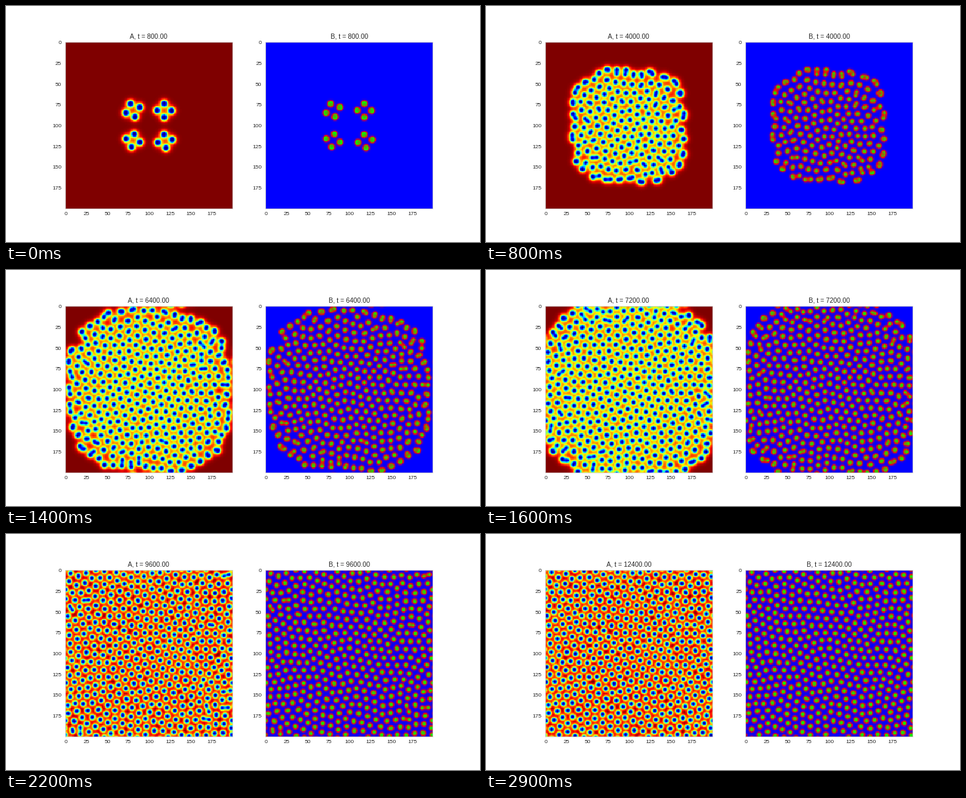
Write a matplotlib script that moves like this. It is 720x360 px and loops after 3 s.

```python
import numpy as np
import matplotlib.pyplot as plt
from matplotlib.animation import FuncAnimation

# Gray-Scott reaction-diffusion on a periodic grid
N = 200
DA, DB, FEED, KILL = 0.14, 0.06, 0.035, 0.065
T_SEED, T_FIRST, T_STEP = 700, 800, 400
FRAMES, INTERVAL = 30, 100

# four colonies of four cells each, as (x, y)
COLONIES = np.array([
    [(77.6, 73.6), (88.6, 77.6), (72.1, 84.7), (82.7, 89.4)],
    [(117.8, 73.6), (126.5, 81.9), (109.5, 81.5), (117.8, 89.8)],
    [(81.9, 110.3), (72.5, 115.5), (88.6, 119.8), (78.8, 125.3)],
    [(117.8, 110.7), (127.3, 116.6), (110.3, 120.2), (119.8, 126.5)],
])

plt.rcParams.update({
    "font.family": "Liberation Sans",
    "text.color": "0.15",
    "axes.edgecolor": "0.8",
    "axes.linewidth": 1,
    "axes.titlesize": 12,
    "xtick.labelsize": 10,
    "ytick.labelsize": 10,
    "xtick.color": "0.15",
    "ytick.color": "0.15",
    "xtick.major.size": 0,
    "ytick.major.size": 0,
    "xtick.major.pad": 7,
    "ytick.major.pad": 7,
})


def seed():
    """Padded fields A and B with a young cell at each seed point."""
    y, x = np.mgrid[:N, :N]
    a = np.ones((N + 2, N + 2), np.float32)
    b = np.zeros_like(a)
    for colony in COLONIES:
        centre = colony.mean(axis=0)
        for cx, cy in centre + 0.93 * (colony - centre):
            r2 = (x - cx) ** 2 + (y - cy) ** 2
            a[1:-1, 1:-1] -= 0.7 * np.exp(-r2 / 18)
            b[1:-1, 1:-1] += 0.43 * np.exp(-r2 / 10.6)
    np.clip(a, 0.2, 1, out=a)
    return a, b


def wrap(u):
    u[0], u[-1] = u[-2], u[1]
    u[:, 0], u[:, -1] = u[:, -2], u[:, 1]


def neighbours(u, out):
    np.add(u[:-2, 1:-1], u[2:, 1:-1], out=out)
    out += u[1:-1, :-2]
    out += u[1:-1, 2:]


def advance(a, b, steps):
    """Explicit Euler with unit time step, in place."""
    ca, cb = a[1:-1, 1:-1], b[1:-1, 1:-1]
    la, lb, react = (np.empty((N, N), np.float32) for _ in range(3))
    for _ in range(steps):
        wrap(a)
        wrap(b)
        neighbours(a, la)
        neighbours(b, lb)
        np.multiply(cb, cb, out=react)
        react *= ca
        la *= DA
        la += FEED
        la -= react
        lb *= DB
        lb += react
        ca *= 1 - 4 * DA - FEED
        ca += la
        cb *= 1 - 4 * DB - FEED - KILL
        cb += lb


def simulate():
    a, b = seed()
    advance(a, b, T_FIRST - T_SEED)
    states = []
    for i in range(FRAMES):
        if i:
            advance(a, b, T_STEP)
        states.append((a[1:-1, 1:-1].copy(), b[1:-1, 1:-1].copy()))
    return states


states = simulate()

fig, axes = plt.subplots(1, 2, figsize=(12, 6), dpi=60, facecolor="white")
images = []
for ax, field, cmap in zip(axes, states[0], ("jet", "brg")):
    images.append(ax.imshow(field, cmap=cmap, interpolation="nearest"))
    ax.set_xticks(range(0, N, 25))
    ax.set_yticks(range(0, N, 25))


def draw(i):
    for ax, image, field, name in zip(axes, images, states[i], "AB"):
        image.set_data(field)
        image.set_clim(field.min(), field.max())
        ax.set_title(f"{name}, t = {T_FIRST + i * T_STEP:.2f}")
    return images


anim = FuncAnimation(fig, draw, frames=FRAMES, init_func=lambda: draw(0),
                     interval=INTERVAL, repeat=True, repeat_delay=0)
plt.show()
```
